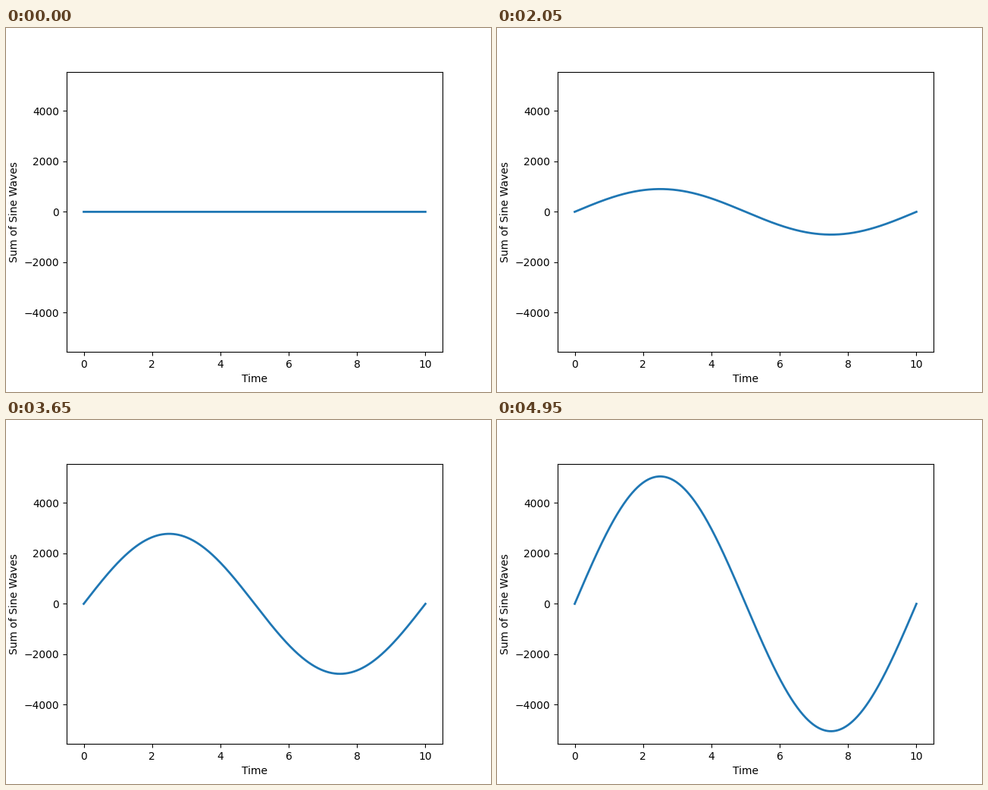
Animation, 640 px wide and 480 px high, one loop 5000 ms. Source, as a matplotlib script:

```python
import numpy as np
import matplotlib.pyplot as plt
from matplotlib.animation import FuncAnimation

FRAMES = 100
INTERVAL = 50  # ms
PERIOD = 10

plt.rcParams["font.family"] = "DejaVu Sans"

t = np.linspace(0, PERIOD, 1000)
wave = np.sin(2 * np.pi * t / PERIOD)


def amplitude(count):
    """Total of the amplitudes 1, 2, ..., count."""
    return count * (count + 1) / 2


fig, ax = plt.subplots(figsize=(6.4, 4.8), dpi=100)
limit = 1.1 * amplitude(FRAMES)
ax.set_xlim(-0.05 * PERIOD, 1.05 * PERIOD)
ax.set_ylim(-limit, limit)
ax.set_xlabel("Time")
ax.set_ylabel("Sum of Sine Waves")
line, = ax.plot(t, wave, color="#1f77b4", lw=2)


def update(frame):
    line.set_ydata(amplitude(frame + 1) * wave)
    return line,


anim = FuncAnimation(fig, update, frames=FRAMES, interval=INTERVAL,
                     repeat=True, repeat_delay=0)
plt.show()
```
